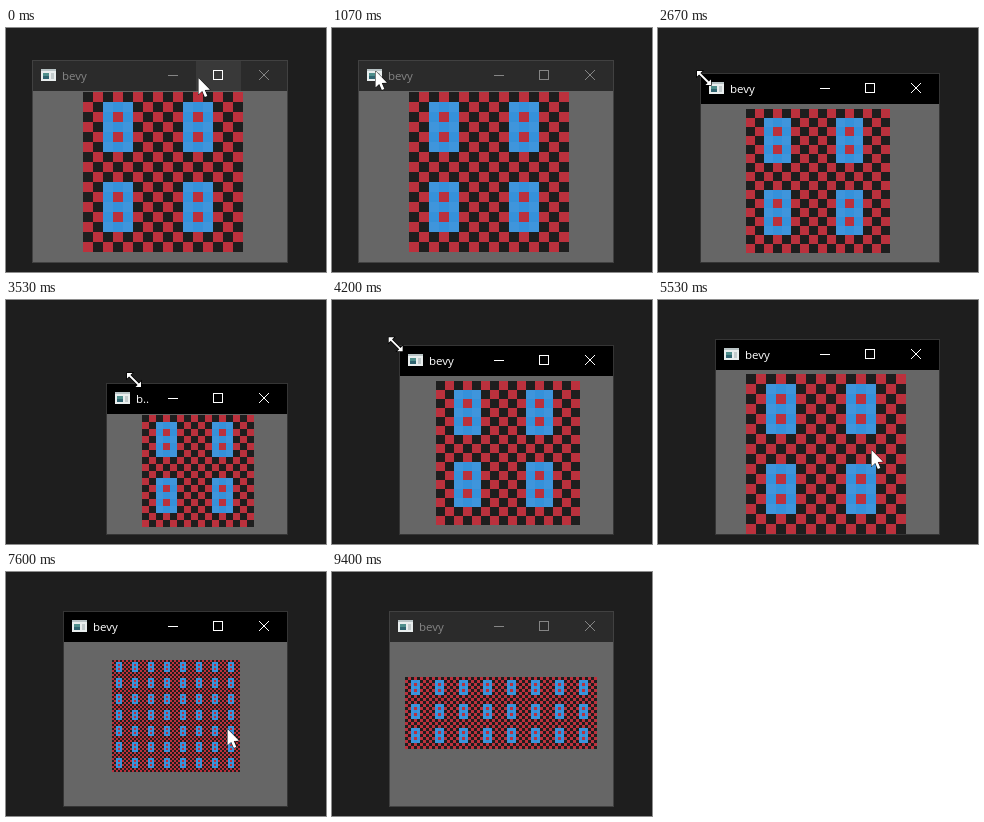
Recreate the animation shown at these times as an HTML page with a canvas. Size 320 by 244 pixels, loop 9540 ms.

```html
<!DOCTYPE html>
<html lang="en">
<head>
<meta charset="utf-8">
<title>Tile map window</title>
<style>
html, body { margin: 0; width: 100%; height: 100%; overflow: hidden; background: #1e1e1e; }
canvas { display: block; width: 320px; height: 244px; }
</style>
</head>
<body>
<canvas id="stage" width="320" height="244"></canvas>
<script>
const ctx = document.getElementById('stage').getContext('2d');
const LOOP = 9540, TICK = 200 / 3;
const RIGHT = 281, BOTTOM = 234;
const CHUNK = 8;
const DARK = '#1e1e1e', RED = '#bb313d';
const BLUES = ['#3591da', '#3f95dc'];

// Pointer path: tick, x, y
const path = [
  [0, 192, 50], [8, 58, 51], [9, 58, 51], [23, 27.5, 34.5], [26, 27.5, 34.5],
  [27, 28, 35], [28, 23.5, 24.5], [29, 21.5, 19.5], [32, 17.5, 16.5], [35, 17.5, 16.5],
  [39, 43.5, 47.5], [40, 46, 50], [47, 150, 125], [52, 135, 85.5], [53, 128, 80],
  [65, 58.5, 41.5], [68, 58.5, 41.5], [72, 145, 117], [75, 145, 117],
  [83, 213, 150], [85, 215, 151], [96, 221, 157], [122, 221, 157], [134, 214, 250]
];

// Ticks at which the map grows or shrinks
const colSteps = [85, 88, 91, 94, 96, 99];
const rowSteps = [103, 105, 108, 111, 114];
const rowDrops = [123, 126, 129, 132];
const passed = (list, k) => list.filter(s => k >= s).length;

function pointer(k) {
  const i = path.findIndex(p => p[0] > k);
  if (i < 0) return path[path.length - 1].slice(1);
  const [t0, x0, y0] = path[i - 1], [t1, x1, y1] = path[i];
  let u = (k - t0) / (t1 - t0);
  if (t1 - t0 > 3) u = u * u * (3 - 2 * u);
  return [x0 + (x1 - x0) * u, y0 + (y1 - y0) * u];
}

// The dragged corner trails the pointer by one tick
function corner(k) {
  if (k < 28) return [26, 32];
  const [x, y] = pointer(Math.min(k - 1, 65));
  return [Math.min(100, Math.floor(x - 1.5)), Math.floor(y - 2.5)];
}

function rect(color, x, y, w, h) {
  ctx.fillStyle = color;
  ctx.fillRect(x, y, w, h);
}

function line(...pts) {
  ctx.beginPath();
  for (let i = 0; i < pts.length; i += 4) {
    ctx.moveTo(pts[i], pts[i + 1]);
    ctx.lineTo(pts[i + 2], pts[i + 3]);
  }
  ctx.stroke();
}

function shape(pts) {
  ctx.beginPath();
  pts.forEach(([x, y]) => ctx.lineTo(x, y));
  ctx.closePath();
}

function isGlyph(c, r) {
  if (c < 2 || c > 4 || r < 1 || r > 5) return false;
  return !(c === 3 && (r === 2 || r === 4));
}

function drawMap(L, T, cols, rows) {
  const left = L + 1, top = T + 31;
  const w = RIGHT - left, h = BOTTOM - top;
  const halfC = Math.ceil(cols / 2), halfR = Math.ceil(rows / 2);
  const cell = Math.max(1, Math.floor(Math.min(w / (halfC * 2 * CHUNK), h / (halfR * 2 * CHUNK))));
  const cx = left + Math.round(w / 2 / cell) * cell;
  const cy = BOTTOM - Math.round(h / 2 / cell) * cell;
  const x0 = cx - Math.floor(cols / 2) * CHUNK * cell;
  const y0 = cy - halfR * CHUNK * cell;
  ctx.save();
  ctx.beginPath();
  ctx.rect(left, top, w, h);
  ctx.clip();
  for (let r = 0; r < rows * CHUNK; r++) {
    for (let c = 0; c < cols * CHUNK; c++) {
      const odd = (r + c) % 2;
      const color = isGlyph(c % CHUNK, r % CHUNK) ? BLUES[odd] : odd ? RED : DARK;
      rect(color, x0 + c * cell, y0 + r * cell, cell, cell);
    }
  }
  ctx.restore();
}

function drawIcon(x, y) {
  rect('#e9eeee', x, y, 15, 12);
  rect('#b9c4c6', x, y, 15, 2);
  rect('#4f8f8c', x + 2, y + 4, 6, 6);
  rect('#2f6470', x + 2, y + 7, 6, 3);
  rect('#c3cccd', x + 10, y + 4, 3, 6);
}

function fitTitle(room) {
  const fits = ['bevy', 'be..', 'b..'].find(s => ctx.measureText(s).width <= room);
  return fits || 'b..';
}

function drawTitle(L, T, active, hover) {
  const ink = active ? '#ffffff' : '#858585';
  rect(active ? '#000000' : '#2b2b2b', L + 1, T + 1, RIGHT - L - 1, 30);
  drawIcon(L + 9, T + 9);
  ctx.font = '11.5px "Open Sans", "Noto Sans", sans-serif';
  ctx.fillStyle = ink;
  ctx.fillText(fitTitle(145 - L - 30), L + 30, T + 20);

  if (hover >= 0) rect('#393939', 145 + hover * 45, T + 1, 45, 30);
  const pen = i => { ctx.strokeStyle = hover === i ? '#ffffff' : ink; };
  ctx.lineWidth = 1;
  const y = T + 10;
  pen(0);
  line(162, y + 5.5, 172, y + 5.5);
  pen(1);
  ctx.strokeRect(207.5, y + 0.5, 9, 9);
  pen(2);
  line(253, y, 263, y + 10, 263, y, 253, y + 10);
}

function drawArrow(x, y) {
  ctx.save();
  ctx.translate(x, y);
  shape([[0.5, 0], [0.5, 16.5], [4.2, 13], [6.8, 19], [9.4, 18], [6.8, 12], [12, 11.7]]);
  ctx.fillStyle = '#ffffff';
  ctx.strokeStyle = '#000000';
  ctx.lineWidth = 1;
  ctx.stroke();
  ctx.fill();
  ctx.restore();
}

function drawResize(x, y) {
  ctx.save();
  ctx.translate(x, y);
  shape([
    [-7, -7], [-1.5, -7], [-3.6, -4.9], [4.9, 3.6], [7, 1.5],
    [7, 7], [1.5, 7], [3.6, 4.9], [-4.9, -3.6], [-7, -1.5]
  ]);
  ctx.fillStyle = '#ffffff';
  ctx.strokeStyle = '#000000';
  ctx.lineWidth = 1.4;
  ctx.stroke();
  ctx.fill();
  ctx.restore();
}

function draw(t) {
  const k = Math.floor((t + 4) / TICK);
  const [L, T] = corner(k);
  const [px, py] = pointer(k);
  const active = k >= 25 && k < 141;
  const overBar = k < 9 && py > T && py < T + 31 && px >= 145;
  const hover = overBar ? Math.floor((px - 145) / 45) : -1;

  rect(DARK, 0, 0, 320, 244);
  rect(active ? '#353535' : '#414141', L, T, RIGHT + 1 - L, BOTTOM + 1 - T);
  rect('#666666', L + 1, T + 31, RIGHT - L - 1, BOTTOM - T - 31);
  drawTitle(L, T, active, hover);
  drawMap(L, T, 2 + passed(colSteps, k), 2 + passed(rowSteps, k) - passed(rowDrops, k));

  if (k >= 20 && k < 70) drawResize(px, py);
  else if (k < 134) drawArrow(Math.round(px), Math.round(py));
}

const start = performance.now();
function tick() {
  draw((performance.now() - start) % LOOP);
  requestAnimationFrame(tick);
}
tick();
</script>
</body>
</html>
```
